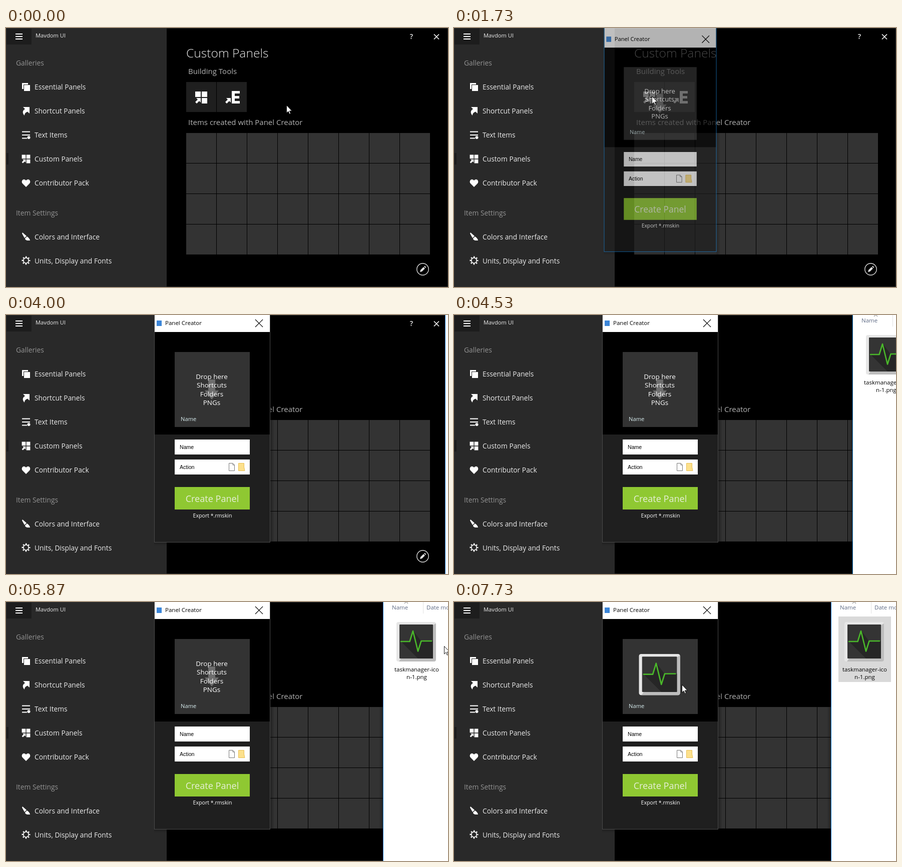
An HTML page for the animation above (8 s loop, 883x518 px).

```html
<!DOCTYPE html>
<html lang="en">
<head>
<meta charset="utf-8">
<title>Panel Creator</title>
<style>
html, body { margin: 0; width: 100%; height: 100%; overflow: hidden; background: #000; }
svg { display: block; width: 883px; height: 518px; }
text { font-family: "Open Sans", "Noto Sans", sans-serif; font-size: 13.8px; fill: #ececec; white-space: pre; }
text.head { fill: #949494; }
text.sub { font-size: 15px; fill: #b2b2b2; }
text.small { font-size: 11.5px; fill: #000; }
text.field { font: 10.6px "Liberation Sans", Arial, sans-serif; fill: #000; }
text.col { font-size: 11.5px; fill: #5f6b85; }
.mid { text-anchor: middle; }
.icon { fill: #fff; }
.line { fill: none; stroke: #fff; stroke-width: 2; }
</style>
</head>
<body>
<svg viewBox="0 0 883 518" xmlns="http://www.w3.org/2000/svg">
  <defs>
    <linearGradient id="fadeR"><stop stop-opacity=".35"/><stop offset="1" stop-opacity=".05"/></linearGradient>
    <linearGradient id="fadeL"><stop stop-opacity=".05"/><stop offset="1" stop-opacity=".35"/></linearGradient>
    <linearGradient id="fadeB" x2="0" y2="1"><stop stop-opacity=".22"/><stop offset="1" stop-opacity="0"/></linearGradient>
    <path id="link" d="M-10 2H-1V11L-4 8-9 13-12 10-7 5Z"/>
    <g id="tiles">
      <path d="M-12-12H-1V-1H-12ZM1-12H12V-1H1ZM1 1H12V12H1Z"/>
      <use href="#link" y="-1"/>
    </g>
    <g id="pulse">
      <rect width="79" height="79" rx="4" fill="#e6e6e6"/>
      <path d="M73 6L79 3V75Q79 79 75 79H5L9 73H73Z" fill="#bdbdbd"/>
      <rect x="6" y="5" width="67" height="68" rx="1" fill="#343434"/>
      <path d="M9 39L43 73H73V38L49 38 34 18 27 39Z" fill="#262626"/>
      <path d="M9 39H26.500L33 18 43 58.500 49.500 38H70" fill="none" stroke="#4ab82a" stroke-width="2.6" stroke-linejoin="round" stroke-linecap="round"/>
    </g>
  </defs>

  <rect width="883" height="518"/>
  <rect width="321" height="518" fill="#292929"/>
  <rect y="1" width="51" height="32" fill="#1d1d1d"/>
  <path class="line" d="M19 12H33M19 17H33M19 22H33"/>
  <rect x="1" y="250" width="4" height="23" fill="#1c1c1c"/>
  <text x="59" y="19" style="font-size:11.2px">Mavdom UI</text>
  <text class="head" x="20" y="75">Galleries</text>
  <text class="head" x="20" y="375">Item Settings</text>
  <g id="menu"></g>

  <g class="icon">
    <g transform="translate(40 118)">
      <rect x="-8" y="-8" width="12" height="12"/>
      <rect x="-4.5" y="-4.5" width="13" height="13" stroke="#292929"/>
    </g>
    <path transform="translate(40 166)" d="M-6-8H7V5L3 1.500C-1 3-3 5-3 9-8 4-7-1-2-4Z"/>
    <g transform="translate(40 214)">
      <path class="line" d="M-8-6.500H8M-8 0H8M-8 6.500H2"/><circle cx="5.500" cy="5" r="3"/>
    </g>
    <use href="#tiles" transform="translate(40 262) scale(.7)"/>
    <path transform="translate(40 310)" d="M0 8L-7 1C-11-4-5-11 0-5 5-11 11-4 7 1Z"/>
    <path transform="translate(40 418)" d="M-7-9L1-2-3 2-8-7ZM2-1Q7 2 8 7H3Q-2 6-2 3Z"/>
    <g transform="translate(40 465)" fill="none" stroke="#fff">
      <circle r="5.300" stroke-width="1.700"/>
      <circle r="7.300" stroke-width="2.400" stroke-dasharray="2.500 3.233" stroke-dashoffset="1.250"/>
    </g>
  </g>

  <text x="360" y="59" style="font-size:24.600px;font-weight:300">Custom Panels</text>
  <text class="sub" x="364" y="92">Building Tools</text>
  <text class="sub" x="364" y="194">Items created with Panel Creator</text>
  <path d="M360 108h60v60h-60zM421 108h60v60h-60z" fill="#1f1f1f"/>
  <g class="icon">
    <use href="#tiles" x="390" y="139"/>
    <use href="#link" x="450" y="138"/>
    <path d="M451 126H467V131H457V136H466V141H457V146H467V151H451Z"/>
  </g>
  <g id="grid" fill="#333"></g>
  <text class="mid" x="810" y="22" style="font-size:14px;font-weight:600">?</text>
  <path d="M855 12.500L865 22.500M865 12.500L855 22.500" class="line" style="stroke-width:1.600"/>
  <circle cx="832.500" cy="482.500" r="11.700" class="line" style="stroke-width:1.400;stroke:#ddd"/>
  <path d="M827 488L828 484 834 478 837 481 831 487ZM835 477L836.500 475.700 839.300 478.500 838 480Z" fill="#e6e6e6"/>
  <rect x=".5" y=".5" width="882" height="517" fill="none" stroke="#2b2b2b"/>

  <g id="tip">
    <rect x="395.500" y="161.500" width="83" height="19" fill="#fff" stroke="#999"/>
    <text class="small" x="401" y="175" style="font-size:11.200px;fill:#444">Panel Creator</text>
  </g>

  <g id="creator">
    <rect x="528" width="7" height="462" fill="url(#fadeR)"/>
    <rect x="296" y="455" width="232" height="7" fill="url(#fadeB)"/>
    <rect x="296.500" y="-10" width="231" height="464.500" fill="#1f1f1f"/>
    <rect x="297" y="-10" width="230" height="44" fill="#fff"/>
    <rect x="297" y="34" width="230" height="205"/>
    <rect id="edge" x="296.500" y="-10" width="231" height="464.500" fill="none"/>
    <rect x="301" y="11" width="10" height="11" fill="#3c86d8"/>
    <text class="small" x="318" y="20">Panel Creator</text>
    <path d="M498 9L513 24M513 9L498 24" stroke="#000" stroke-width="1.200"/>
    <rect x="337" y="74" width="150" height="150" fill="#333"/>
    <g id="hint">
      <path d="M404 129H418V151H425L411 169 397 151H404Z" fill="#6e6e6e"/>
      <g id="drops"></g>
    </g>
    <use id="dropped" href="#pulse" transform="translate(369.500 104) scale(1.04)"/>
    <text x="349" y="212" style="font-size:11.200px;fill:#d9eef0">Name</text>
    <path d="M337 249h150v30h-150zM337 289h150v30h-150z" fill="#fff"/>
    <text class="field" x="347" y="268">Name</text>
    <text class="field" x="347" y="308">Action</text>
    <path d="M445.500 296.500H453L456.500 300V311.500H445.500ZM453 296.500V300H456.500" fill="#fff" stroke="#777"/>
    <path d="M464.500 296.500H475.500V304L477 311.500H464.500Z" fill="#fce08c" stroke="#e8bf55"/>
    <rect x="337" y="344" width="150" height="45" fill="#8fc832"/>
    <text class="mid" x="412" y="374" style="font-size:18.100px;fill:#e7efd8">Create Panel</text>
    <text class="mid" x="412.500" y="405" style="font-size:10.600px;fill:#fff">Export *.rmskin</text>
  </g>

  <g id="files">
    <rect x="-8" width="8" height="518" fill="url(#fadeL)"/>
    <rect width="140" height="518" fill="#fff"/>
    <rect x="-1" width="1" height="518" fill="#1883d7"/>
    <path d="M42 3L45.500-.500 49 3" fill="none" stroke="#666"/>
    <path d="M79.500 0V23" stroke="#e2e2e2"/>
    <text class="col" x="17" y="15">Name</text>
    <text class="col" x="86" y="15">Date modified</text>
    <rect id="pick" x="14" y="29" width="105" height="131"/>
    <use href="#pulse" x="26" y="40"/>
    <text class="small mid" x="66.500" y="139">taskmanager-ico</text>
    <text class="small mid" x="66.500" y="154">n-1.png</text>
  </g>

  <g id="cursor">
    <g id="arrow">
      <path d="M.500 .500V16L4 12.700 6.300 18.200 8.600 17.200 6.300 11.900H11.300Z" fill="#fff" stroke="#000" stroke-width=".9"/>
      <g id="plus">
        <rect x="10.500" y="20.500" width="10" height="10" fill="#fff" stroke="#000"/>
        <path d="M15.500 22.500V28.500M12.500 25.500H18.500" stroke="#000"/>
      </g>
    </g>
    <g id="deny" fill="none">
      <path d="M-5-5L5 5" stroke="#000" stroke-width="4.500"/>
      <circle r="7.500" stroke="#000" stroke-width="4.500"/>
      <circle r="7.500" stroke="#fff" stroke-width="2.500"/>
      <path d="M-5-5L5 5" stroke="#fff" stroke-width="2.500"/>
    </g>
  </g>
</svg>
<script>
const $ = id => document.getElementById(id);
const LOOP = 8000, STEP = 1000 / 15;

const labels = [
  [123, "Essential Panels"], [171, "Shortcut Panels"], [219, "Text Items"],
  [267, "Custom Panels"], [315, "Contributor Pack"],
  [423, "Colors and Interface"], [471, "Units, Display and Fonts"]
];
$("menu").innerHTML = labels.map(([y, s]) => `<text x="57" y="${y}">${s}</text>`).join("");

$("drops").innerHTML = ["Drop here", "Shortcuts", "Folders", "PNGs"].map((s, i) =>
  `<text class="mid" x="411" y="${128 + Math.round(i * 17.4)}" style="font-size:13.500px;fill:#fff">${s}</text>`).join("");

let cells = "";
for (let i = 0; i < 32; i++)
  cells += `<rect x="${360 + i % 8 * 61}" y="${210 + (i >> 3) * 61}" width="60" height="60"/>`;
$("grid").innerHTML = cells;

// Rows: time in ms, then values
const pointer = [
  [0, 560, 154], [200, 546, 162], [400, 500, 174], [600, 440, 171], [867, 400, 150],
  [1200, 396, 144], [1400, 395, 136], [2067, 395, 136], [2267, 400, 207],
  [2400, 422, 237], [2533, 490, 246], [2667, 590, 243], [2800, 730, 235], [2867, 811, 230],
  [5800, 883, 89], [5867, 875, 88], [6067, 838, 84], [6200, 824, 86], [6333, 780, 122],
  [6467, 715, 150], [6667, 604, 165], [6867, 545, 166], [7067, 492, 165],
  [7267, 461, 165], [7400, 455, 165]
];
const slide = [
  [3800, 892], [3867, 882], [4000, 878], [4133, 864], [4267, 841],
  [4533, 797], [4667, 775], [4867, 762], [5133, 754]
];
const opening = [[1533, 0], [1600, .15], [1733, .7], [1933, 1]];
const tooltip = [[1133, 0], [1200, .18], [1400, 1]];

function at(rows, t) {
  if (t <= rows[0][0]) return rows[0].slice(1);
  for (let i = 1; i < rows.length; i++) {
    const a = rows[i - 1], b = rows[i];
    if (t <= b[0]) {
      const k = (t - a[0]) / (b[0] - a[0]);
      return a.slice(1).map((v, j) => v + (b[j + 1] - v) * k);
    }
  }
  return rows[rows.length - 1].slice(1);
}

const show = (id, on) => { $(id).style.display = on ? "" : "none"; };

function draw(ms) {
  const t = Math.floor(ms / STEP + .06) * STEP;

  $("tip").style.opacity = t < 1590 ? at(tooltip, t)[0] : 0;

  const [p] = at(opening, t), s = .9 + .1 * p;
  $("creator").style.opacity = p;
  $("creator").setAttribute("transform", `translate(412 215) scale(${s}) translate(-412 -215)`);
  $("edge").setAttribute("stroke", t < 3660 ? "#1883d7" : "#4a4a4a");
  show("hint", t < 7730);
  show("dropped", t >= 7730);

  const left = Math.round(at(slide, t)[0]);
  $("files").setAttribute("transform", `translate(${left} 0)`);
  $("pick").setAttribute("fill", t < 6060 ? "none" : t < 6260 ? "#e5f3ff" : "#d9d9d9");

  const [x, y] = at(pointer, t).map(Math.round);
  const drag = t > 6260 && t < 7730, deny = drag && x > 528 && x < 754;
  show("cursor", t < 2930 || t > 5860);
  $("cursor").setAttribute("transform", `translate(${x} ${y})`);
  show("arrow", !deny);
  show("deny", deny);
  show("plus", drag && x <= 528);
}

const start = performance.now();
function tick() {
  draw((performance.now() - start) % LOOP);
  requestAnimationFrame(tick);
}
tick();
</script>
</body>
</html>
```
